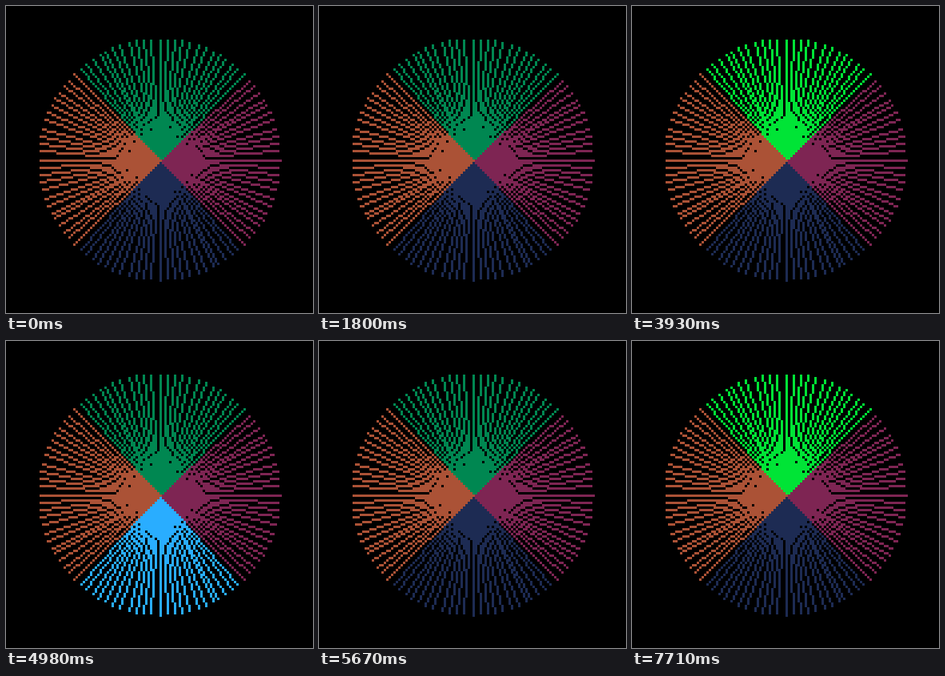
These frames come from a looping animation (384x384 px, 8 s). An HTML page with a canvas:

```html
<!DOCTYPE html>
<html lang="en">
<head>
<meta charset="utf-8">
<title>Light wheel</title>
<style>
  html, body { margin: 0; width: 100%; height: 100%; overflow: hidden; background: #000; }
  canvas { display: block; width: 384px; height: 384px; image-rendering: pixelated; }
</style>
</head>
<body>
<canvas id="stage" width="384" height="384"></canvas>
<script>
const ctx = document.getElementById('stage').getContext('2d');
const CELL = 3, CENTER = 64, RADIUS = 50, SPOKES = 96, LOOP = 8000;

// Drawn in this order; each sector overpaints the edge it shares with the one before.
const sectors = [
  { first: 60, dim: '#1d2b53', lit: '#29adff', on: [[690, 1140], [1650, 1800], [3030, 3480], [4980, 5160], [6810, 7260]] },
  { first: 84, dim: '#7e2553', lit: '#7e2553', on: [] },
  { first: 12, dim: '#008751', lit: '#00e436', on: [[3930, 4380], [5430, 5670], [7710, 8000]] },
  { first: 36, dim: '#ab5236', lit: '#ab5236', on: [] }
];

function plot(x, y) {
  ctx.fillRect(x * CELL, y * CELL, CELL, CELL);
}

// Hard-pixel line from the center, stepping along its longer axis.
function drawLine(x1, y1) {
  const dx = x1 - CENTER, dy = y1 - CENTER;
  const steps = Math.max(Math.abs(dx), Math.abs(dy));
  for (let i = 0; i <= steps; i++) {
    plot(Math.round(CENTER + dx * i / steps), Math.round(CENTER + dy * i / steps));
  }
}

function drawSpoke(index) {
  // Turns are kept in 16-bit fractions, as on a small fixed-point machine.
  const turn = Math.floor(index * 65536 / SPOKES) / 65536;
  const angle = turn * 2 * Math.PI;
  const snap = v => Math.floor(v + 1e-6);
  drawLine(snap(CENTER + RADIUS * Math.cos(angle)), snap(CENTER - RADIUS * Math.sin(angle)));
}

function draw(time) {
  ctx.fillStyle = '#000';
  ctx.fillRect(0, 0, 384, 384);
  for (const { first, dim, lit, on } of sectors) {
    ctx.fillStyle = on.some(([from, to]) => time >= from && time < to) ? lit : dim;
    for (let i = 0; i <= SPOKES / 4; i++) drawSpoke(first + i);
  }
}

let start = null;
function frame(now) {
  if (start === null) start = now;
  draw((now - start) % LOOP);
  requestAnimationFrame(frame);
}
draw(0);
requestAnimationFrame(frame);
</script>
</body>
</html>
```
